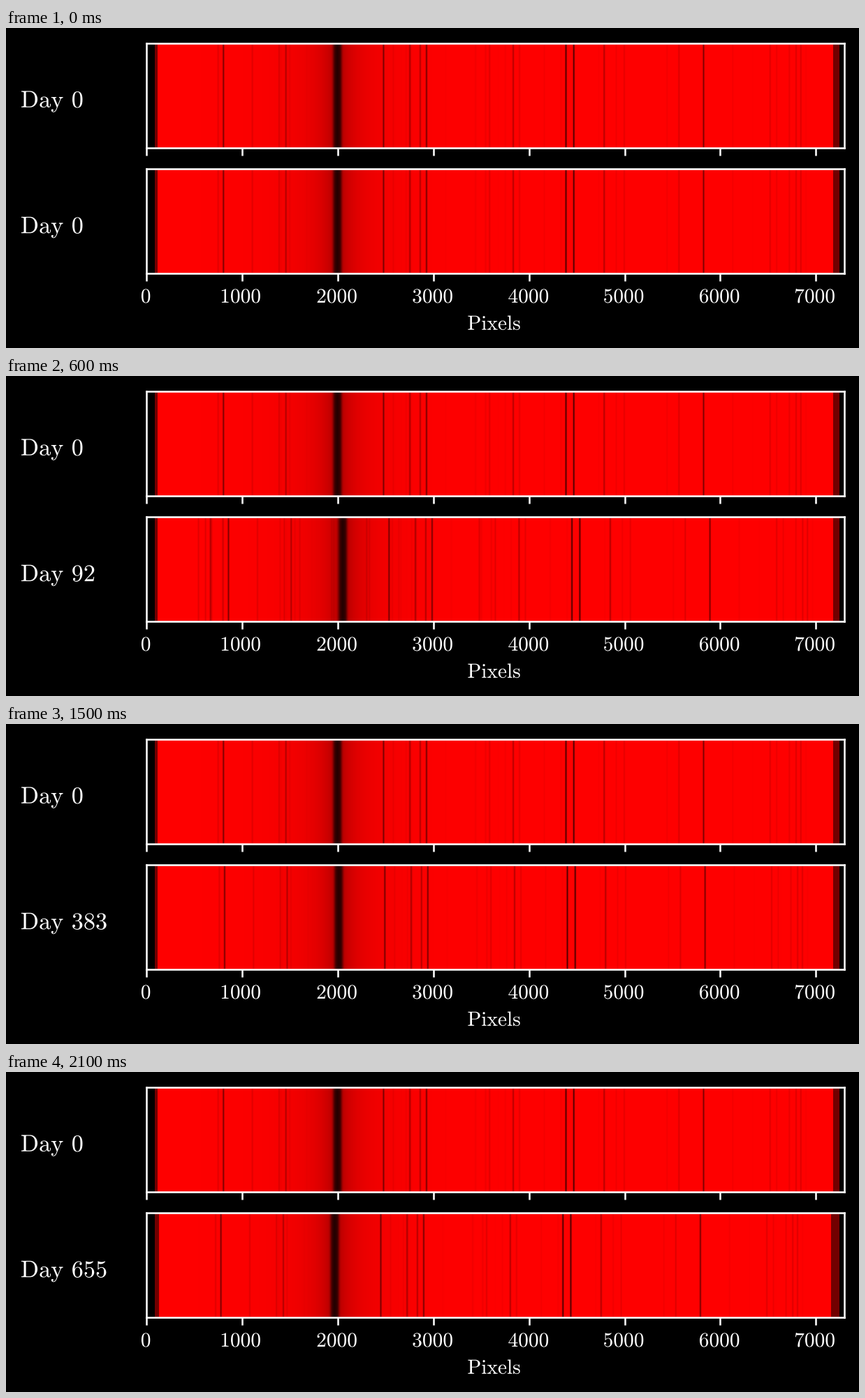
Recreate the animation shown at these times as a matplotlib script. Size 1221 px wide and 459 px high, loop 2.2 s.

```python
import numpy as np
import matplotlib.pyplot as plt
from matplotlib.animation import FuncAnimation
from matplotlib.patches import PathPatch
from matplotlib.textpath import TextPath
from matplotlib.transforms import Affine2D

W, H, DPI = 1221, 459, 180
FRAMES, STEP = 22, 100
LEFT, RIGHT = 201.3, 1200.3
SPAN = 7300
DAY_EM, TICK_EM = 34.3, 29.4

plt.rcParams.update({
    "mathtext.fontset": "cm",
    "axes.edgecolor": "white",
    "axes.linewidth": 1.02,
    "xtick.color": "white",
    "xtick.major.width": 1.02,
    "xtick.major.size": 4.2,
})

# Depth of each class of dark line and where its lines stand
LINES = {.68: [4384, 4466],
         .5: [805, 2478, 2927, 5822],
         .28: [1458, 2752, 2861, 3833, 4783]}

rng = np.random.default_rng(4)
STAR = [(pos, depth) for depth, group in LINES.items() for pos in group]
STAR += zip(rng.uniform(200, 7000, 45), .14 * rng.random(45) ** 2)

# Fixed lines that appear only at large shifts
AIR = [(669, .3)]
AIR += zip(rng.uniform(300, 3700, 14), rng.uniform(.03, .15, 14))

x = (np.arange(1000) + .5) * SPAN / 1000


def day_at(i):
    return int(round(np.interp(i, [0, 3, 6, 11, 15, 17, 21],
                               [0, 82, 92, 122, 383, 504, 655])))


def shift_at(day):
    """Yearly drift of the spectrum, zero on the first day."""
    wave = lambda d: 42.5 * np.cos(2 * np.pi * (d - 112) / 365)
    return wave(day) - wave(0)


def moved(pos, shift):
    return pos + shift * (.92 + 5e-5 * pos)


def line(pos, depth):
    return 1 - depth * np.exp(-.5 * ((x - pos) / 6) ** 2)


def spectrum(day):
    shift = shift_at(day)
    d = np.abs(x - moved(1996, shift))
    level = 1 - (.24 * np.exp(-d / 110) + .14 * np.exp(-d / 400)
                 + .48 * np.exp(-(d / 47) ** 4))
    for pos, depth in STAR:
        level *= line(moved(pos, shift), depth)
    strength = np.clip((shift - 30) / 26, 0, 1)
    for pos, depth in AIR:
        level *= line(pos, depth * strength)

    first, last = (132, 7155) if day > 450 else (119, 7178)
    level[(x < first) | (x > last)] = .45
    level[(x < 86) | (x > 7245)] = 0
    rgb = np.zeros((1, len(x), 3))
    rgb[0, :, 0] = level
    return rgb


def text_path(left, base, text, em):
    """Outline of the text with its ink starting at left."""
    path = TextPath((0, 0), text, size=em)
    place = Affine2D().translate(left - path.get_extents().x0, H - base)
    return path.transformed(place)


def label(*spec):
    patch = PathPatch(text_path(*spec), facecolor="white", linewidth=0,
                      transform=Affine2D().scale(1 / W, 1 / H)
                      + fig.transFigure)
    return fig.add_artist(patch)


def day_label(day, base):
    text = r"$\mathrm{Day}\hspace{0.38}\mathrm{%d}$" % day
    return 22, base, text, DAY_EM


def strip(top, bottom):
    ax = fig.add_axes([LEFT / W, 1 - bottom / H,
                       (RIGHT - LEFT) / W, (bottom - top) / H])
    img = ax.imshow(spectrum(0), extent=(0, SPAN, 0, 1), aspect="auto",
                    interpolation="nearest")
    ax.set_xticks(range(0, SPAN, 1000))
    ax.set_yticks([])
    ax.tick_params(labelbottom=False)
    return img


fig = plt.figure(figsize=((W + 1e-6) / DPI, (H + 1e-6) / DPI), dpi=DPI,
                 facecolor="black")
strip(21.7, 171.7)
lower = strip(201.7, 351.7)

label(*day_label(0, 114))
counter = label(*day_label(0, 294.5))
for value in range(0, SPAN, 1000):
    tick = LEFT + value * (RIGHT - LEFT) / SPAN
    half = len(str(value)) * TICK_EM / 4
    label(tick - half, 394, r"$\mathrm{%d}$" % value, TICK_EM)
label(661.3, 433, r"$\mathrm{Pixels}$", TICK_EM)


def update(i):
    day = day_at(i)
    lower.set_data(spectrum(day))
    counter.set_path(text_path(*day_label(day, 294.5)))
    return lower, counter


anim = FuncAnimation(fig, update, frames=FRAMES, interval=STEP,
                     repeat=True, repeat_delay=0)
plt.show()
```
